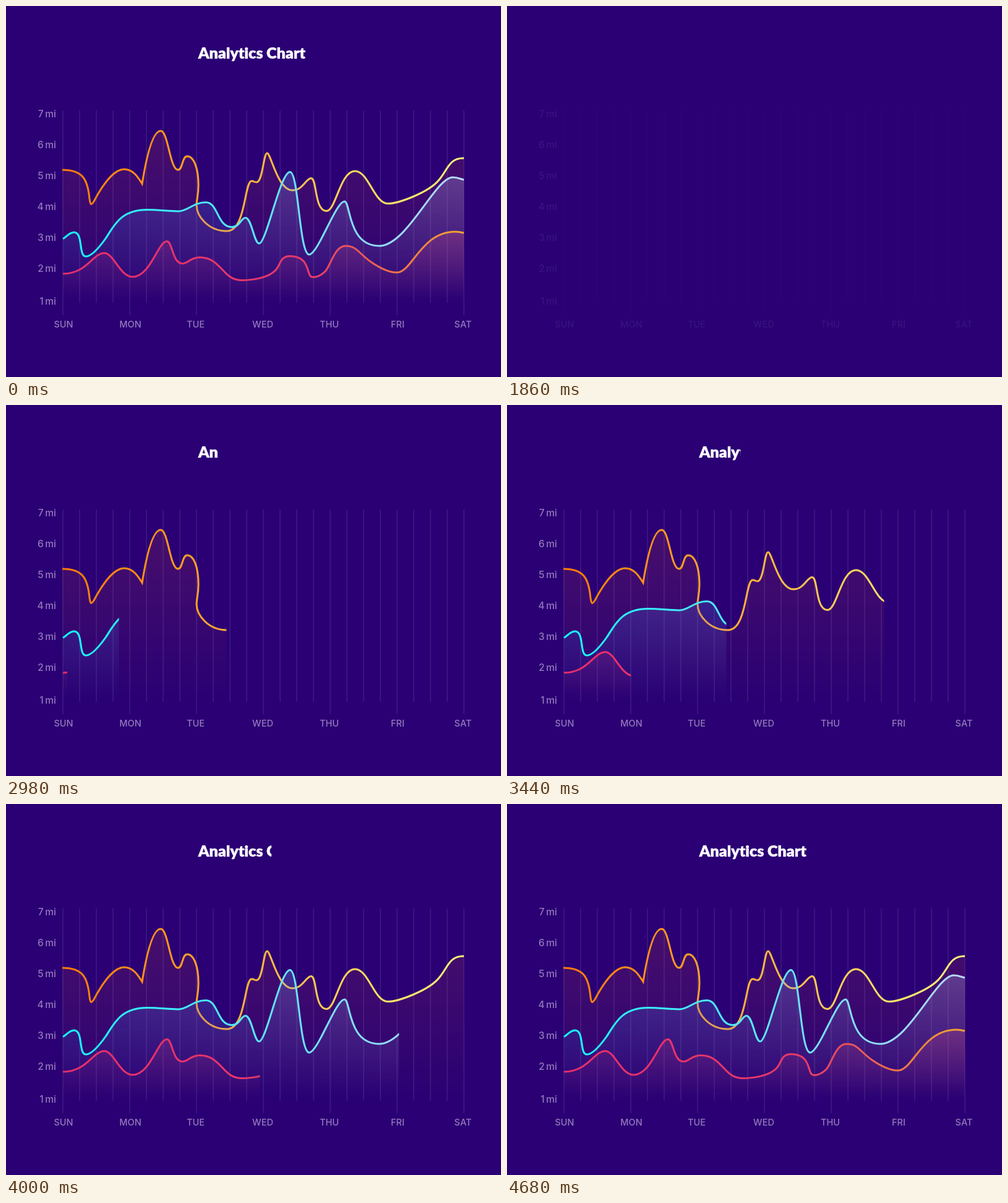
An HTML page that plays this animation: 800 by 600 pixels, repeating every 8000 ms.

```html
<!DOCTYPE html>
<html lang="en">
<head>
<meta charset="utf-8">
<title>Analytics Chart</title>
<style>
  html, body { margin: 0; width: 100%; height: 100%; overflow: hidden; background: #2a0074; }
  #stage { position: relative; width: 800px; height: 600px; overflow: hidden; }
  svg { position: absolute; left: 0; top: 0; width: 800px; height: 600px; animation: 8s linear infinite; }
  text { font-family: Inter, Roboto, sans-serif; font-weight: 500; fill: #9678bd; }
  .scale text { font-size: 15.5px; text-anchor: end; word-spacing: -1.5px; }
  .days text { font-size: 14.5px; text-anchor: middle; }
  #title text {
    font: 900 25px Lato, "Open Sans", sans-serif; font-variant-ligatures: none;
    fill: #fff; stroke: #fff; stroke-width: .5px;
  }

  #axes { animation-name: axes; }
  #title { animation-name: title; }
  #orange { animation-name: orange; }
  #cyan { animation-name: cyan; }
  #pink { animation-name: pink; }

  @keyframes axes {
    0% { opacity: 1; animation-timing-function: step-end; }
    6.25% { opacity: 0; animation-timing-function: step-end; }
    23.25% { opacity: .15; animation-timing-function: step-end; }
    24.5% { opacity: .3; animation-timing-function: linear; }
    28.75%, 100% { opacity: 1; }
  }
  @keyframes title {
    0% { clip-path: inset(0 299px 0 0); animation-timing-function: step-end; }
    6.25% { clip-path: inset(0 800px 0 0); animation-timing-function: step-end; }
    26.15% { clip-path: inset(0 495px 0 0); animation-timing-function: cubic-bezier(.02, 0, .35, 0); }
    58.25%, 100% { clip-path: inset(0 299px 0 0); }
  }
  @keyframes orange {
    0% { clip-path: inset(0 59px 0 0); animation-timing-function: step-end; }
    6.25% { clip-path: inset(0 800px 0 0); animation-timing-function: step-end; }
    26.675% { clip-path: inset(0 708px 0 0); animation-timing-function: cubic-bezier(.02, 0, .35, 0); }
    45.6%, 100% { clip-path: inset(0 59px 0 0); }
  }
  @keyframes cyan {
    0% { clip-path: inset(0 59px 0 0); animation-timing-function: step-end; }
    6.25% { clip-path: inset(0 800px 0 0); animation-timing-function: step-end; }
    31.34% { clip-path: inset(0 708px 0 0); animation-timing-function: cubic-bezier(.02, 0, .35, 0); }
    52.3%, 100% { clip-path: inset(0 59px 0 0); }
  }
  @keyframes pink {
    0% { clip-path: inset(0 59px 0 0); animation-timing-function: step-end; }
    6.25% { clip-path: inset(0 800px 0 0); animation-timing-function: step-end; }
    35.95% { clip-path: inset(0 708px 0 0); animation-timing-function: cubic-bezier(.02, 0, .35, 0); }
    58.25%, 100% { clip-path: inset(0 59px 0 0); }
  }
</style>
</head>
<body>
<div id="stage">
  <svg id="axes" viewBox="0 0 800 600">
    <path id="grid" stroke="#fff" stroke-opacity=".08" stroke-width="2"/>
    <g class="scale">
      <text x="81" y="180">7 mi</text>
      <text x="81" y="230">6 mi</text>
      <text x="81" y="280">5 mi</text>
      <text x="81" y="330">4 mi</text>
      <text x="81" y="380">3 mi</text>
      <text x="81" y="430">2 mi</text>
      <text x="81" y="483">1 mi</text>
    </g>
    <g class="days">
      <text x="93" y="520">SUN</text>
      <text x="201" y="520">MON</text>
      <text x="306.5" y="520">TUE</text>
      <text x="415" y="520">WED</text>
      <text x="522.5" y="520">THU</text>
      <text x="633" y="520">FRI</text>
      <text x="738.5" y="520">SAT</text>
    </g>
  </svg>
  <svg id="orange" viewBox="0 0 800 600"></svg>
  <svg id="cyan" viewBox="0 0 800 600"></svg>
  <svg id="pink" viewBox="0 0 800 600"></svg>
  <svg id="title" viewBox="0 0 800 600"><text x="310.8" y="84.5">Analytics Chart</text></svg>
</div>
<script>
  const series = [
    {
      id: 'orange', top: 202, alpha: .14,
      ink: { 0: '#ff780a', .25: '#ff961e', .5: '#ffb841', .78: '#ffdc64', 1: '#fff578' },
      fill: { 0: '#ff6a3c', 1: '#ff6a3c' },
      line: `M91 265C124 265 132 280 135 312C136.5 323 138 322 142 316C152 297 172 264 191 264
        C206 264 214 278 220 287.5C226 250 236 202 250 202C262 202 265 265 278 265
        C286 265 284 243 293 243C303 243 311 261 311 290C311 307 308 312 308 322
        C308 340 327 364 357 364C388 364 385 283 397 283C401 283 401 285 405 285
        C415 285 416 238 422 238C428 238 439 298 463 298C480 298 485 278.5 493 278.5
        C503 278.5 498 331.5 518 331.5C533 331.5 540 267 564 267C586 267 595 319.5 617 319.5
        C635 319.5 684 301 700 281C715 263 716 246 740 246`
    },
    {
      id: 'cyan', top: 268, alpha: .3,
      ink: { 0: '#14ffff', .22: '#37eefa', .6: '#6ee1fa', 1: '#b9d7fa' },
      fill: { 0: '#3c78e6', 1: '#b4b4dc' },
      line: `M92 376.5C97 374 102 366 110 366C125 366 117 405 129 405C139 405 151 390 161 376
        C174 357 184 329.5 228 329.5C248 329.5 262 332 278 332C294 332 302 317.5 323 317.5
        C343 317.5 341 357.5 365 357.5C378 357.5 380 342.5 387 342.5C397 342.5 401 384 409 384
        C421 384 443 268.5 459 268.5C473 268.5 474 402 490 402C504 402 533 316 547 316
        C557 316 552 388 603 388C648 388 694 277 722 277C730 277 735 280 740 281`
    },
    {
      id: 'pink', top: 365, alpha: .25,
      ink: { 0: '#e62d6b', .6: '#e63a69', .78: '#eb6450', 1: '#f0a532' },
      fill: { 0: '#c8327d', 1: '#dc5a82' },
      line: `M92 433C131 433 140 399.5 159 399.5C174 399.5 184 438 205 438
        C233 438 246 380.5 260 380.5C269 380.5 269 416.5 285 416.5C294 416.5 298 406.5 313 406.5
        C348 406.5 350 443.5 380 443.5C398 443.5 424 440 436 427C444 418 443 404.5 459 404.5
        C494 404.5 484 438.5 496 438.5C504 438.5 511 434 516 429C525 419 531 388 549 388
        C567 388 570 400 590 414C606 425 620 431 632 431C656 431 671 365 726 365
        C732 365 736 366 740 367`
    }
  ];

  // Every fourth grid line marks a day and reaches lower.
  let grid = '';
  for (let i = 0; i <= 24; i++) grid += `M${92 + 27 * i} 169V${i % 4 ? 480 : 500}`;
  document.getElementById('grid').setAttribute('d', grid);

  function acrossGradient(id, stops) {
    const list = Object.entries(stops)
      .sort((a, b) => a[0] - b[0])
      .map(([at, colour]) => `<stop offset="${at}" stop-color="${colour}"/>`);
    return `<linearGradient id="${id}" gradientUnits="userSpaceOnUse" x1="92" x2="740" y1="0" y2="0">${list.join('')}</linearGradient>`;
  }

  for (const { id, top, alpha, ink, fill, line } of series) {
    document.getElementById(id).innerHTML = `
      <defs>
        ${acrossGradient(id + '-ink', ink)}
        ${acrossGradient(id + '-fill', fill)}
        <linearGradient id="${id}-fade" gradientUnits="userSpaceOnUse" x1="0" x2="0" y1="${top}" y2="480">
          <stop offset="0" stop-color="#fff" stop-opacity="${alpha}"/>
          <stop offset="1" stop-color="#fff" stop-opacity="0"/>
        </linearGradient>
        <mask id="${id}-mask" maskUnits="userSpaceOnUse" x="0" y="0" width="800" height="600">
          <rect width="800" height="600" fill="url(#${id}-fade)"/>
        </mask>
      </defs>
      <path d="${line}V480H92Z" fill="url(#${id}-fill)" mask="url(#${id}-mask)"/>
      <path d="${line}" fill="none" stroke="url(#${id}-ink)" stroke-width="3"/>`;
  }
</script>
</body>
</html>
```
